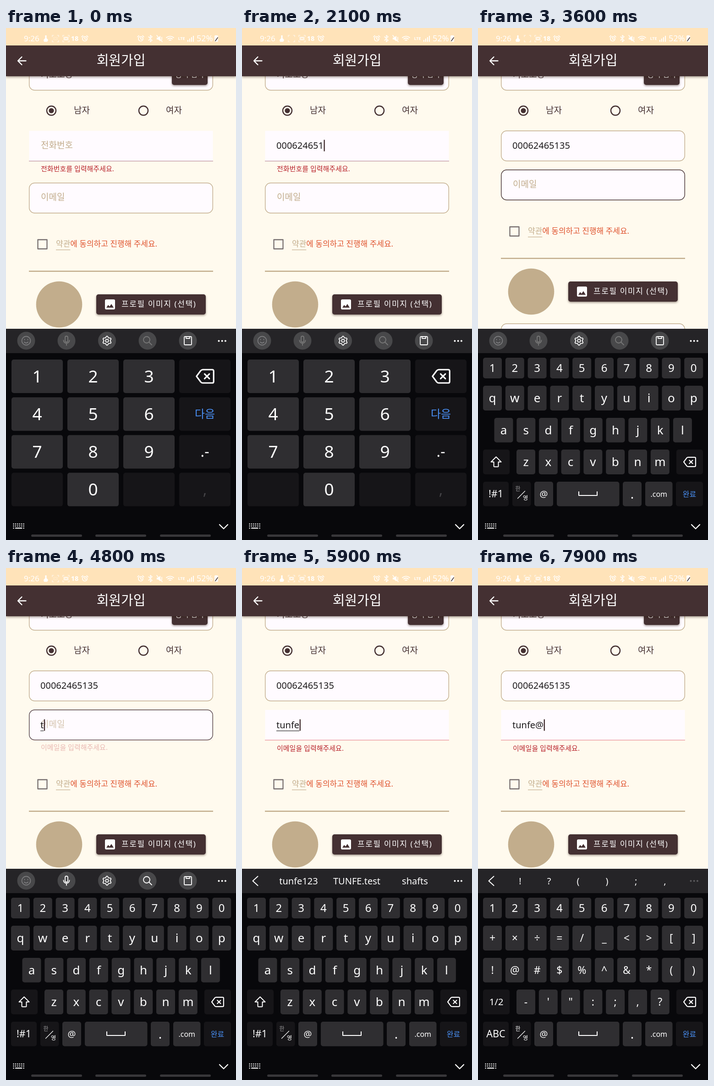
Animation, 502 px wide and 1115 px high, one loop 8000 ms. Source, as an HTML page with a canvas:

```html
<!DOCTYPE html>
<html lang="ko">
<head>
<meta charset="utf-8">
<title>회원가입</title>
<style>
html, body { margin: 0; width: 100%; height: 100%; overflow: hidden; background: #08080b; }
canvas { display: block; }
</style>
</head>
<body>
<canvas id="stage" width="502" height="1115"></canvas>
<script>
const g = document.getElementById('stage').getContext('2d');
const LOOP = 8000;
const FONT = '"Noto Sans", "Noto Sans CJK KR", sans-serif';
const BROWN = '#443032', TAN = '#c2ad8c', PAPER = '#fffbff', WHITE = '#fff';
const KEY = '#2f2e31', DARK = '#161518', LIT = '#3e3d40', BLUE = '#4a91f7', DIM = '#7b7b7d';

// Typing schedule
const PHONE = '00062465135', MAIL = 'tunfe@';
const phoneAt = [350, 600, 800, 1020, 1250, 1450, 1700, 1880, 2040, 2200, 2340];
const mailAt = [4750, 5050, 5200, 5380, 5640, 7840];
const NEXT = 3000, LETTERS = 3200, SYMBOLS = 6980, FADE = 167;
const presses = [
  ...phoneAt.map((at, i) => [PHONE[i], at]),
  ['다음', NEXT],
  ...mailAt.map((at, i) => [MAIL[i], at]),
  ['!#1', SYMBOLS]
];
const hints = [
  [4900, ['tunfe', 'tunfe123', 'TUN']],
  [5380, ['tunfe', 'tunfe123', 'TUNFE']],
  [5640, ['tunfe123', 'TUNFE.test', 'shafts']]
];

let t = 0, held, popup;

const ramp = (from, length) => Math.min(1, Math.max(0, (t - from) / length));
const typed = (word, times) => word.slice(0, times.filter(at => at <= t).length);

function fade(alpha, draw) {
  g.save();
  g.globalAlpha *= alpha;
  draw();
  g.restore();
}

// Text centred vertically on y
function text(s, x, y, size, color, align = 'center', weight = 400, spacing = 0) {
  g.font = `${weight} ${size}px ${FONT}`;
  g.letterSpacing = spacing + 'px';
  g.textAlign = align;
  g.fillStyle = color;
  g.fillText(s, x, y + size * 0.36);
  return g.measureText(s).width;
}

function rect(x, y, w, h, color, r = 0) {
  g.beginPath();
  g.roundRect(x, y, w, h, r);
  g.fillStyle = color;
  g.fill();
}

function disc(x, y, r, color) {
  g.beginPath();
  g.arc(x, y, r, 0, 7);
  g.fillStyle = color;
  g.fill();
}

// Path drawn relative to (x, y)
function icon(x, y, d, color = WHITE, width = 1.8, filled = false) {
  g.save();
  g.translate(x, y);
  g.lineWidth = width;
  g.lineCap = g.lineJoin = 'round';
  g.strokeStyle = g.fillStyle = color;
  const path = new Path2D(d);
  filled ? g.fill(path) : g.stroke(path);
  g.restore();
}

const ring = r => `M${r} 0A${r} ${r} 0 1 1 ${-r} 0A${r} ${r} 0 1 1 ${r} 0`;

function shadowed(blur, dy, draw) {
  g.save();
  g.shadowColor = 'rgba(40,20,10,.45)';
  g.shadowBlur = blur;
  g.shadowOffsetY = dy;
  draw();
  g.restore();
}

/* ---------- status bar and header ---------- */

function alarm(x) {
  icon(x, 23.5, ring(5) + 'M0 -3V0L2 1.5M-7 -4L-4 -7M7 -4L4 -7', WHITE, 1.6);
}

function capture(x, alpha) {
  icon(x, 23, 'M-7 -4V-7H-4M4 -7H7V-4M7 4V7H4M-4 7H-7V4', 'rgba(255,255,255,.8)', 1.2);
  fade(alpha, () => icon(x, 23, ring(2.5) + 'M-4.5 -3H4.5V3H-4.5Z', WHITE, 1.2));
}

function statusBar() {
  rect(0, 0, 502, 38, '#ffe3b9');
  text('9:26', 39, 23, 17, WHITE, 'left');
  icon(87, 23, 'M-1.5 -7H1.5V-1L5 3L3 7H-4L-5 3L-1.5 -1Z', WHITE, 1, true);
  const phase = t % 1600;
  capture(108, phase < 100 ? 0.25 : phase > 1100 ? 1 : 0);
  capture(131, 1);
  text('18', 150, 23, 14.5, WHITE, 'center', 700);
  alarm(172);
  alarm(294);
  icon(315, 23, 'M-4 -4L4 4L0 7V-7L4 -4L-4 4', WHITE, 1.5);
  icon(335, 23, 'M-6 -2H-3L2 -6V6L-3 2H-6Z', WHITE, 1, true);
  icon(335, 23, 'M-6 -7L6 7M5 -3V3', WHITE, 1.5);
  icon(358, 24, 'M-8 -3Q0 -9 8 -3M-5 0Q0 -4 5 0M-2 3Q0 1 2 3', WHITE, 1.7);
  text('LTE', 383, 23, 9, WHITE, 'center', 600);
  for (let i = 0; i < 4; i++) rect(396 + i * 4, 26 - i * 3, 2, 4 + i * 3, WHITE);
  text('52%', 416, 23, 18, WHITE, 'left');
  rect(455, 16, 8, 14, WHITE, 2);
  icon(459, 24, 'M-2 4L3 -3', '#544', 1.8);
}

function header() {
  shadowed(5, 2, () => rect(0, 37, 502, 68, BROWN));
  statusBar();
  icon(34.5, 71.5, 'M9 0H-8M0 -8.5L-8.5 0L0 8.5', WHITE, 2.3);
  text('회원가입', 251, 71, 29, WHITE, 'center', 500);
}

/* ---------- form ---------- */

// bad: 0 = plain outline, 1 = underlined error style
function field(y, focused = false, bad = 0, line = TAN) {
  rect(50.5, y, 401, 65.5, PAPER, 12 * (1 - bad));
  if (bad < 1) fade(1 - bad * bad, () => {
    g.beginPath();
    g.roundRect(50.7, y, 400.6, 65.5, 12);
    g.strokeStyle = focused ? BROWN : TAN;
    g.lineWidth = 1.4;
    g.stroke();
  });
  if (bad) fade(bad * bad, () => rect(50, y + 65, 402, 1.4, line));
}

function error(s, y, shown) {
  if (shown) fade(shown, () => text(s, 76, y - 4 * (1 - shown), 15, '#b8232b', 'left', 500));
}

function entry(value, y, focused, lastEvent, composing) {
  const w = value ? text(value, 75, y, 20, '#1d1b1c', 'left') : 0;
  if (composing && w) rect(75, y + 12, w, 1.2, '#333');
  if (focused && (t - lastEvent) % 1000 < 500) rect(75.5 + w, y - 12.5, 2.4, 25, BROWN);
}

function radio(x, label, on) {
  icon(x, 180, ring(10), BROWN, 2.4);
  if (on) disc(x, 180, 5.6, BROWN);
  text(label, x + 49, 179, 19, BROWN, 'left', 500);
}

function form() {
  rect(0, 37, 502, 620, '#fffaee');
  const phone = typed(PHONE, phoneAt), mail = typed(MAIL, mailAt);
  const last = [-600, ...phoneAt, NEXT, ...mailAt].filter(at => at <= t).pop();
  const phoneBad = 1 - ramp(phoneAt[10], FADE);
  const mailBad = ramp(mailAt[0], FADE);
  const onMail = t >= NEXT;

  field(70);
  text('기보도랑', 76, 101, 19, BROWN, 'left', 500);
  shadowed(4, 2, () => rect(362, 80, 78, 44, BROWN, 5));
  text('중복 검사', 401, 101, 16, WHITE);

  radio(99, '남자', true);
  radio(300, '여자', false);

  field(224, !onMail, phoneBad, '#c7a3ad');
  if (!phone) text('전화번호', 76, 255, 19, TAN, 'left', 500);
  entry(phone, 256, !onMail, last);
  error('전화번호를 입력해주세요.', 307, phoneBad);

  const mailY = phoneBad ? 337.5 : 309;
  field(mailY, onMail, mailBad, '#eda0a6');
  if (mailBad < 1) fade(1 - mailBad, () => text('이메일', 76, mailY + 31, 19, TAN, 'left', 500));
  entry(mail, mailY + 33, onMail, last, mail.length < 6);
  error('이메일을 입력해주세요.', 393, mailBad);

  g.save();
  g.translate(0, phoneBad || mailBad ? 28 : 0);
  icon(79.5, 443, 'M-10 -10H10V10H-10Z', '#777071', 2.3);
  const w = text('약관', 109, 442, 17, TAN, 'left', 500);
  rect(109, 454.5, w, 1.2, TAN);
  text('에 동의하고 진행해 주세요.', 109 + w, 442, 17, '#df522d', 'left', 500);
  rect(50, 500.5, 402, 2.5, TAN);
  disc(116, 574, 50.3, TAN);
  shadowed(4, 2, () => rect(197, 552, 239, 44, BROWN, 5));
  rect(216, 563, 22, 22, WHITE, 3);
  icon(227, 576, 'M-8 5L-4 -1L-1 2.5L3 -3L8 5Z', BROWN, 1, true);
  text('프로필 이미지 (선택)', 252, 573, 17, WHITE, 'left', 500, 1.6);
  field(644);
  g.restore();
}

/* ---------- keyboard ---------- */

const gear = Array.from({ length: 49 }, (_, i) => {
  const a = i * Math.PI / 24, r = 8.4 + 1.4 * Math.cos(6 * a);
  return (i ? 'L' : 'M') + r * Math.sin(a) + ' ' + r * Math.cos(a);
}).join('') + 'Z';

function toolIcons() {
  const shade = v => `rgb(${v},${v},${v})`;
  const wake = shade(120 + Math.round(135 * ramp(3700, 200)));
  const tools = [
    [44, ring(9.5) + 'M-4 3Q0 7 4 3M-3.5 -3V-2M3.5 -3V-2', DIM],
    [132, 'M-3 -7A3 3 0 0 1 3 -7V0A3 3 0 0 1 -3 0ZM-6.5 -1A6.5 6.5 0 0 0 6.5 -1M0 6V10', wake],
    [220.5, gear + ring(3.2), WHITE],
    [309, 'M5 -2A7 7 0 1 1 -9 -2A7 7 0 1 1 5 -2M3.5 3.5L9 9', wake],
    [397, 'M-8 -7Q-8 -9 -6 -9H6Q8 -9 8 -7V7Q8 9 6 9H-6Q-8 9 -8 7ZM-4 -9V-5H4V-9', WHITE]
  ];
  for (const [x, d, color] of tools) {
    disc(x, 681, 19.5, '#48484a');
    icon(x, 681, d, color);
  }
}

function suggestions() {
  const i = hints.filter(([at]) => at <= t).length - 1;
  const [at, words] = hints[i], old = i ? hints[i - 1][1] : ['', '', ''];
  const p = ramp(at, 100);
  words.forEach((word, n) => {
    const x = 123.5 + n * 127;
    if (word === old[n]) return text(word, x, 682, 20, WHITE);
    if (p < 1) fade(1 - p, () => text(old[n], x, 682, 20, WHITE));
    fade(p, () => text(word, x, 682, 20, WHITE));
  });
}

function toolbar() {
  rect(0, 655, 502, 53, '#252427');
  const done = t >= mailAt[5];
  for (let i = 0; i < 3; i++) disc(464.5 + i * 7.2, 681.5, 2, done ? '#5b5a5d' : WHITE);
  if (t < hints[0][0]) return toolIcons();
  icon(29, 681.5, 'M5.5 -10L-5.5 0L5.5 10', WHITE, 2);
  if (done) [...'!?();,'].forEach((c, i) => text(c, 92 + i * 63.2, 682, 20, WHITE));
  else suggestions();
}

function key(x, y, w, h, label = '', size = 26, fill = KEY, color = WHITE) {
  rect(x, y, w, h, held === label ? LIT : fill, 5);
  if (label) text(label, x + w / 2, y + h / 2, size, color);
}

function backspace(x, y, k) {
  g.save();
  g.translate(x, y);
  g.scale(k, k);
  icon(0, 0, 'M-18 0L-9 -12Q-7 -14 -5 -14H15Q18 -14 18 -11V11Q18 14 15 14H-5Q-7 14 -9 12ZM-1 -5L9 5M9 -5L-1 5', WHITE, 3);
  g.restore();
}

function numpad() {
  for (let i = 0; i < 16; i++) {
    const col = i % 4, row = i >> 2, x = 12 + col * 122, y = 722 + row * 82.2;
    const label = ['123', '456', '789', ' 0 '][row][col];
    if (label && label !== ' ') key(x, y, 112, 73, label, 37);
    else if (i === 7) key(x, y, 112, 73, '다음', 24, DARK, BLUE);
    else if (i === 11) key(x, y, 112, 73, '.-', 32, DARK);
    else if (i === 15) key(x, y, 112, 73, ',', 32, DARK, '#454447');
    else key(x, y, 112, 73, '', 0, DARK);
  }
  backspace(434.5, 758.5, 1.04);
}

function row(chars, x, y, h, size) {
  [...chars].forEach((c, i) => {
    const kx = x + i * 48.8;
    key(kx, y, 41, h, c, size);
    if (c === held) popup = [c, kx + 20.5, y];
  });
}

function fullBoard(symbols) {
  const rows = symbols
    ? ['+×÷=/_<>[]', '!@#$%^&*()', '-\'":;,?']
    : ['qwertyuiop', 'asdfghjkl', 'zxcvbnm'];
  const size = symbols ? 23 : 26;
  row('1234567890', 11, 718, 45, 24);
  row(rows[0], 11, 779, 54, size);
  row(rows[1], symbols ? 11 : 35.5, 849, 53.5, size);
  row(rows[2], 84, 918, 54, size);

  key(11, 918, 58, 54, symbols ? '1/2' : '', 20.5, DARK);
  if (!symbols) icon(39.5, 945, 'M0 -11L11 0H5V9Q5 10.5 3.5 10.5H-3.5Q-5 10.5 -5 9V0H-11Z', WHITE, 2);
  key(433, 918, 58, 54, '', 0, DARK);
  backspace(462, 945, 0.72);

  key(11, 988, 56, 53.5, symbols ? 'ABC' : '!#1', 21.5, DARK);
  key(75, 988, 40.5, 53.5, '', 0, DARK);
  text('한', 87, 1004, 12, symbols ? WHITE : '#9a999b');
  text('영', 103.5, 1023, 12.5, WHITE);
  icon(94.5, 1016.5, 'M-8 8L8 -8', WHITE, 1.2);
  rect(123, 988, 41, 53.5, KEY, 5);
  text('@', 143.5, 1014.5, 20, WHITE);
  key(172, 988, 136.5, 53.5);
  icon(240, 1014, 'M-20 -4V4H20V-4', WHITE, 2);
  key(316, 988, 41, 53.5, '.', 28);
  key(365, 988, 59.5, 53.5, '.com', 16);
  key(432, 988, 59, 53.5, '완료', 16, DARK, BLUE);
}

function keyboard() {
  rect(0, 655, 502, 460, '#08080b');
  toolbar();
  popup = null;
  if (t < LETTERS) numpad();
  else fullBoard(t >= SYMBOLS);

  for (let i = 0; i < 15; i++) {
    const r = Math.floor(i / 6);
    if (r < 2) rect(15.5 + (i % 6) * 4.4, 1079 + r * 4.4, 2.2, 2.2, WHITE);
  }
  rect(15.5, 1088, 2.2, 2.2, WHITE);
  rect(20, 1088, 15.3, 2.2, WHITE);
  rect(37.5, 1088, 2.2, 2.2, WHITE);
  icon(475, 1086, 'M-9 -4.5L0 4.5L9 -4.5', WHITE, 2.3);
  for (const x of [55, 195, 336]) rect(x, 1103, 111, 5, '#38373a', 2.5);

  if (popup) {
    const [c, x, y] = popup;
    shadowed(4, 1, () => rect(x - 38, y - 108, 76, 97, '#28272b', 10));
    text(c, x, y - 58, 39, WHITE);
  }
}

function draw() {
  const press = presses.find(([, at]) => t > at - 90 && t < at + 45);
  held = press && press[0];
  g.clearRect(0, 0, 502, 1115);
  form();
  header();
  keyboard();
}

const start = performance.now();
function tick() {
  t = (performance.now() - start) % LOOP;
  draw();
  requestAnimationFrame(tick);
}
tick();
</script>
</body>
</html>
```
